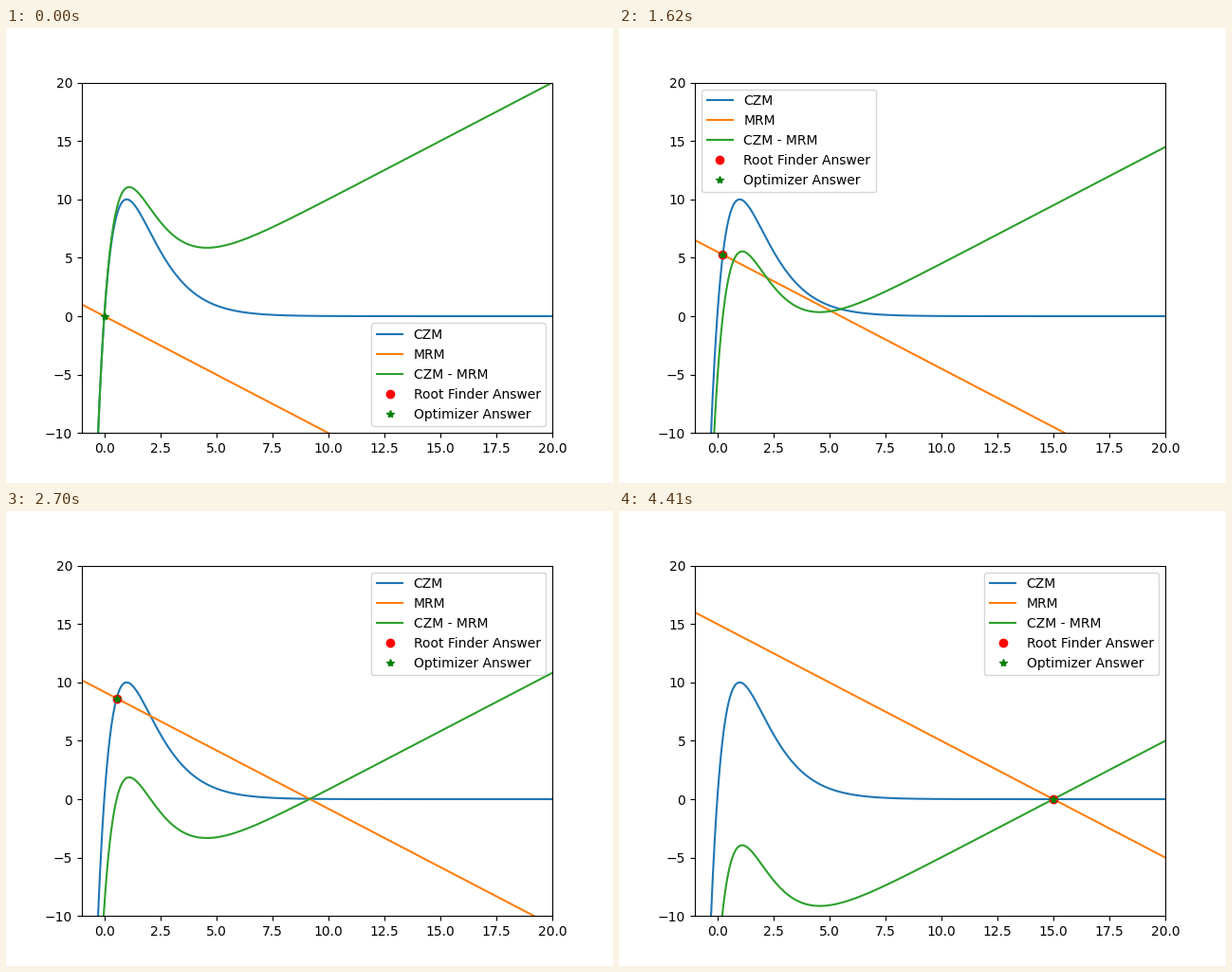
A matplotlib script for the animation above (4500 ms loop, 640 by 480 pixels).

```python
import numpy as np
import matplotlib.pyplot as plt
from matplotlib.animation import FuncAnimation

FRAMES = 50
INTERVAL = 90
MAX_OFFSET = 15

x = np.linspace(-1, 20, 1000)


def czm(x):
    return 10 * x * np.exp(1 - x)


def mrm(x, offset):
    return offset - x


def first_root(gap):
    """Locate the first upward zero crossing of the sampled gap."""
    i = np.argmax(gap >= 0)
    return np.interp(0, gap[i - 1:i + 1], x[i - 1:i + 1])


fig, ax = plt.subplots(figsize=(6.4, 4.8), dpi=100)
ax.set_xlim(-1, 20)
ax.set_ylim(-10, 20)

ax.plot(x, czm(x), label="CZM")
mrm_line, = ax.plot(x, mrm(x, 0), label="MRM")
gap_line, = ax.plot(x, czm(x) - mrm(x, 0), label="CZM - MRM")
root_dot, = ax.plot([0], [0], "ro", label="Root Finder Answer")
optimum_star, = ax.plot([0], [0], "g*", label="Optimizer Answer")
# "best" is re-evaluated on every draw, so the legend dodges the curves
ax.legend(loc="best")


def update(frame):
    offset = MAX_OFFSET * frame / (FRAMES - 1)
    line = mrm(x, offset)
    gap = czm(x) - line
    mrm_line.set_ydata(line)
    gap_line.set_ydata(gap)

    root = first_root(gap)
    for marker in (root_dot, optimum_star):
        marker.set_data([root], [mrm(root, offset)])
    # The root finder gives no answer without an offset
    root_dot.set_visible(frame > 0)
    return mrm_line, gap_line, root_dot, optimum_star


anim = FuncAnimation(fig, update, frames=FRAMES, interval=INTERVAL,
                     init_func=lambda: update(0), repeat=True, repeat_delay=0)
plt.show()
```
